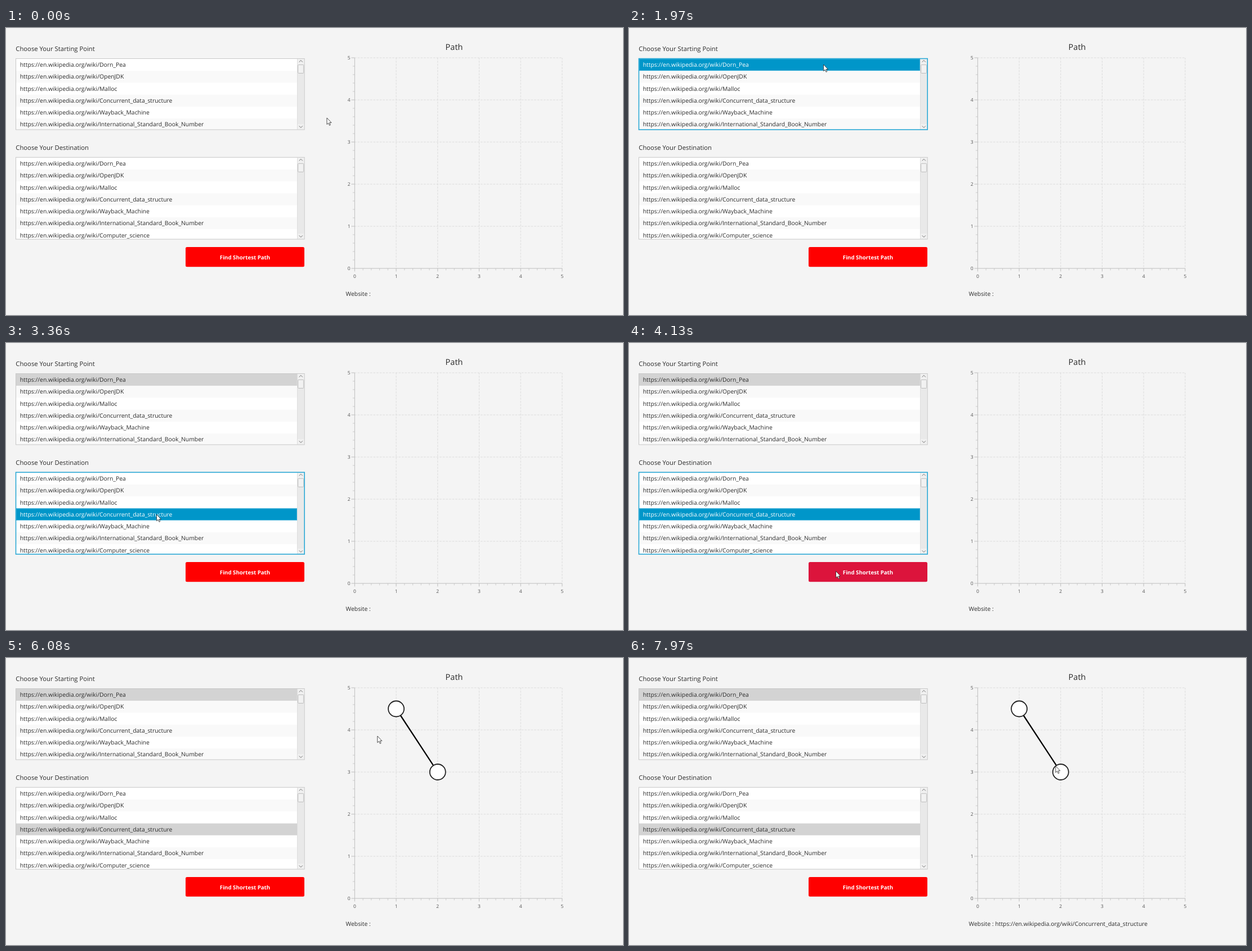
An HTML page that plays this animation: 1096x511 px, repeating every 8000 ms.

```html
<!DOCTYPE html>
<html lang="en">
<head>
<meta charset="utf-8">
<title>Shortest path</title>
<style>
  html, body { margin: 0; width: 100%; height: 100%; overflow: hidden; background: #f4f4f4; }
  svg { display: block; width: 100%; height: 100%; }
  text { font-family: "Open Sans", "Noto Sans", sans-serif; font-size: 10.38px; fill: #2b2b2b; text-rendering: geometricPrecision; }
</style>
</head>
<body>
<svg id="stage" viewBox="0 0 1096 511"></svg>
<script>
const LOOP = 8000;
const BASE = 'https://en.wikipedia.org/wiki/';
const PAGES = ['Dorn_Pea', 'OpenJDK', 'Malloc', 'Concurrent_data_structure',
  'Wayback_Machine', 'International_Standard_Book_Number', 'Computer_science'];
const stage = document.getElementById('stage');

function set(el, attrs) {
  for (const k in attrs) el.setAttribute(k, attrs[k]);
  return el;
}
function add(tag, attrs, parent = stage) {
  return parent.appendChild(set(document.createElementNS('http://www.w3.org/2000/svg', tag), attrs));
}
function label(str, x, y, attrs = {}, parent = stage) {
  const el = add('text', { x, y, ...attrs }, parent);
  el.textContent = str;
  return el;
}
function rect(x, y, width, height, fill, attrs = {}, parent = stage) {
  return add('rect', { x, y, width, height, fill, ...attrs }, parent);
}
function path(d, stroke, attrs = {}, parent = stage) {
  return add('path', { d, stroke, fill: 'none', ...attrs }, parent);
}

// List view with a scroll bar; select() restyles one row and the border.
function makeList(id, top, height, chosen) {
  const clip = add('clipPath', { id });
  rect(17, top, 514, height, '#000', {}, clip);
  const g = add('g', { 'clip-path': `url(#${id})` });
  rect(17, top, 513, height, '#fff', {}, g);
  const rows = PAGES.map((page, i) => {
    const y = top + i * 21.25;
    const fill = i % 2 ? '#f9f9f9' : '#fff';
    const bg = rect(18, y, 499, 21.25, fill, {}, g);
    const ring = rect(18.5, y + .5, 498, 20.2, 'none', { stroke: '#2ba9d6', visibility: 'hidden' }, g);
    const text = label(BASE + page, 24.7, y + 14.2, {}, g);
    return { bg, ring, text, fill };
  });
  const bottom = top + height;
  rect(517, top, 13, height, '#f0f0f0', {}, g);
  rect(517.5, top + 10, 12, height - 20, '#e9e9e9', {}, g);
  path(`M517.5 ${top}V${bottom}`, '#dedede', {}, g);
  rect(518.7, top + 10.5, 10, 15, '#f1f1f1', { stroke: '#bdbdbd', rx: 1 }, g);
  path(`M520.7 ${top + 5.6}l3.1 -3.1l3.1 3.1M520.7 ${bottom - 6.6}l3.1 3.1l3.1 -3.1`, '#707070', {}, g);
  const border = rect(17.5, top - .5, 512.7, height + .5, 'none');
  return {
    select(on, focused) {
      const { bg, ring, text, fill } = rows[chosen];
      set(bg, { fill: !on ? fill : focused ? '#0096c9' : '#d3d3d3' });
      set(ring, { visibility: focused ? 'visible' : 'hidden' });
      text.style.fill = focused ? '#fff' : '';
      set(border, focused ? { stroke: '#2aa8d5', 'stroke-width': 1.6 } : { stroke: '#c8c8c8', 'stroke-width': 1 });
    }
  };
}

// Chart coordinates
const px = v => 619.4 + v * 73.7;
const py = v => 428 - v * 75;

function makeAxes() {
  let grid = '', major = '', minor = '';
  const small = { style: 'font-size:8.5px;fill:#555' };
  for (let i = 0; i <= 5; i++) {
    if (i) grid += `M${px(i)} 53V428M619.4 ${py(i)}H988`;
    major += `M${px(i)} 428v5.5M619.4 ${py(i)}h-6`;
    label(i, px(i), 445, { ...small, 'text-anchor': 'middle' });
    label(i, 611.5, py(i) + 3.2, { ...small, 'text-anchor': 'end' });
    for (let j = 1; j < 5 && i < 5; j++)
      minor += `M${px(i + j / 5)} 428v3.5M619.4 ${py(i + j / 5)}h-3.5`;
  }
  path(grid, '#dcdcdc', { 'stroke-dasharray': '3.7 1.9', 'stroke-dashoffset': .5 });
  path(minor, '#c8c8c8', { 'stroke-width': .9 });
  path(major + 'M619.4 53V428H988', '#bdbdbd');
}

label('Choose Your Starting Point', 17.3, 41, { style: 'font-size:11.28px' });
label('Choose Your Destination', 17.3, 216.8, { style: 'font-size:11.28px' });
const from = makeList('fromClip', 55, 126, 0);
const to = makeList('toClip', 230.8, 145.2, 3);
const button = rect(319, 390, 211, 35.3, '#f00', { rx: 2.5 });
label('Find Shortest Path', 424.5, 411.6,
  { 'text-anchor': 'middle', style: 'font-size:9.7px;font-weight:700;fill:#fff' });
label('Path', 796, 39.4, { 'text-anchor': 'middle', style: 'font-size:14.5px' });
makeAxes();
const site = label('Website :', 603.6, 477);

const graph = add('g', {});
const edge = path('', '#000', { 'stroke-width': 2.3 }, graph);
const [nodeA, nodeB] = [1, 2].map(v => add('circle',
  { cx: px(v), cy: py(4.5), r: 14, fill: '#fff', stroke: '#222', 'stroke-width': 1.8 }, graph));

const glow = add('circle', { r: 11, fill: '#ffff00', 'fill-opacity': .6 });
const cursor = path('M0 0V11.6L2.7 9.2L4.5 13.4L6.3 12.6L4.6 8.6H8.1Z', '#222',
  { fill: '#fff', 'stroke-width': .8 });

// Pointer moves: first step, last step, step count, end x, end y, easing
const smooth = k => k * k * (3 - 2 * k);
const easeOut = k => 1 - (1 - k) * (1 - k);
const MOVES = [
  [550, 1100, 8, 347.5, 82.5, smooth],
  [1175, 1330, 3, 346.8, 70, easeOut],
  [1410, 1480, 2, 345.5, 65, easeOut],
  [2200, 2880, 10, 267.5, 305.2, smooth],
  [3670, 4130, 7, 367.5, 406.3, smooth],
  [5620, 6080, 7, 659.8, 139, smooth],
  [6180, 6400, 4, 680.3, 102, easeOut],
  [6480, 6640, 3, 687.5, 95, easeOut],
  [7270, 7830, 8, 757.8, 192.2, smooth]
];
const CLICKS = [[1710, 1970], [3120, 3360], [4280, 4520]];

function pointer(t) {
  let x = 570, y = 160;
  for (const [start, end, n, ex, ey, ease] of MOVES) {
    if (t < start) break;
    const gap = (end - start) / (n - 1);
    const k = ease(Math.min(n, Math.floor((t - start) / gap + .01) + 1) / n);
    x += (ex - x) * k;
    y += (ey - y) * k;
  }
  return [x, y];
}

// Constant speed with short ramps at both ends
function easeBoth(k) {
  if (k < .2) return 3.125 * k * k;
  if (k > .8) return 1 - 3.125 * (1 - k) * (1 - k);
  return 1.25 * k - .125;
}

function draw(t) {
  const [x, y] = pointer(t);
  set(cursor, { transform: `translate(${x} ${y})` });
  const lit = CLICKS.some(([a, b]) => t >= a && t < b);
  set(glow, { cx: x, cy: y, visibility: lit ? 'visible' : 'hidden' });

  from.select(t >= 1710, t >= 1710 && t < 3190);
  to.select(t >= 3190, t >= 3190 && t < 4280);

  const hover = x > 319 && x < 530 && y > 390 && y < 425;
  set(button, { fill: hover ? '#dc143c' : '#f00', height: t < 4280 ? 35.3 : 34.7 });

  set(graph, { visibility: t >= 4520 ? 'visible' : 'hidden' });
  const tick = 4520 + Math.floor((t - 4520) / 79 + .12) * 79;
  const k = Math.min(1, Math.max(0, (tick - 4470) / 800));
  const by = py(4.5 - 1.5 * easeBoth(k));
  set(nodeB, { cy: by });
  set(edge, { d: `M${px(1)} ${py(4.5)}L${px(2)} ${by}` });

  const page = t < 6400 ? '' : ' ' + BASE + PAGES[t < 7750 ? 0 : 3];
  site.textContent = 'Website :' + page;
}

const begin = performance.now();
function loop() {
  draw((performance.now() - begin) % LOOP);
  requestAnimationFrame(loop);
}
draw(0);
requestAnimationFrame(loop);
</script>
</body>
</html>
```
